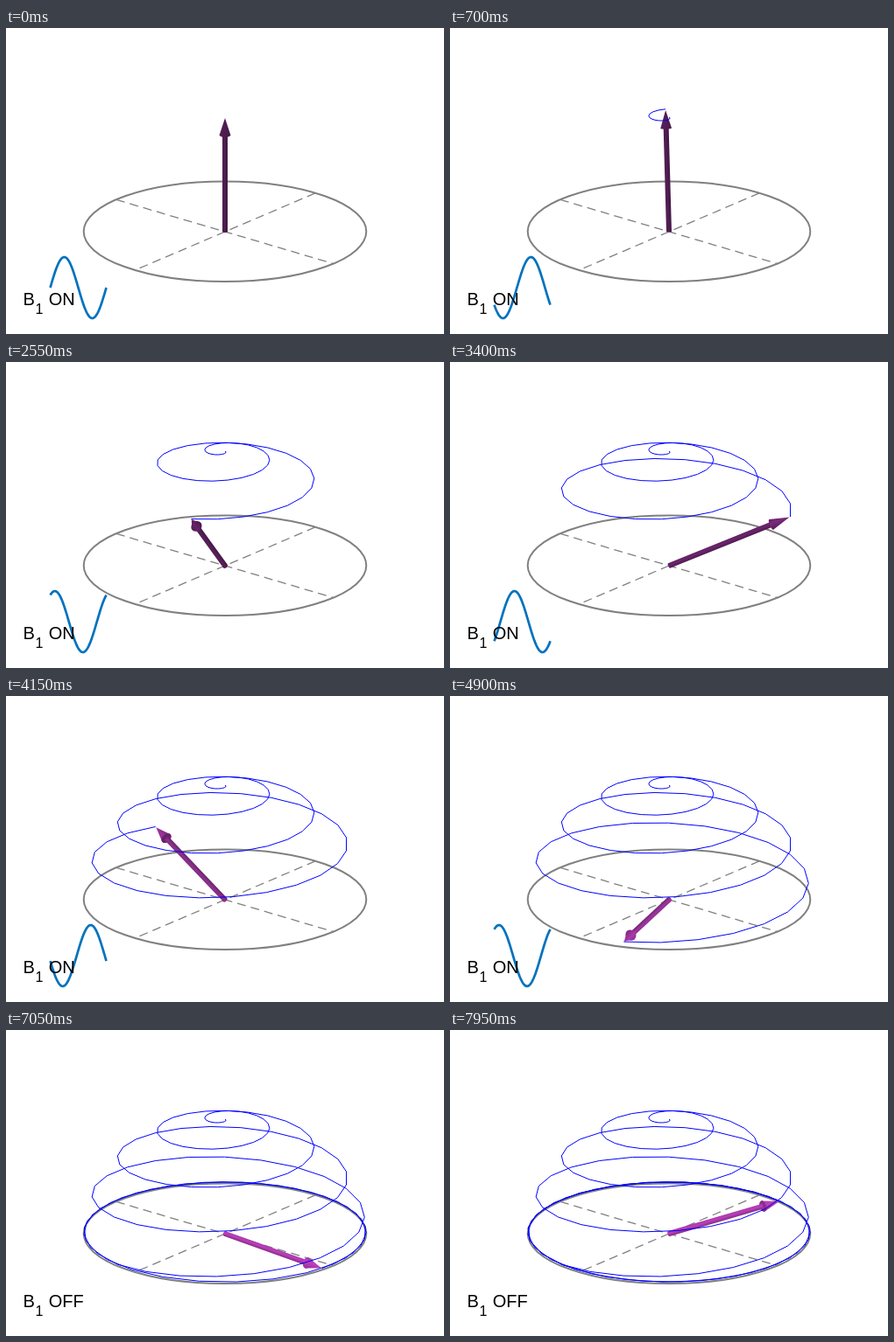
An HTML page with a canvas that plays this animation: 500 px wide and 350 px high, repeating every 8 s.

```html
<!DOCTYPE html>
<html lang="en">
<head>
<meta charset="utf-8">
<title>Precession</title>
<style>
html, body { margin: 0; width: 100%; height: 100%; overflow: hidden; background: #fff; }
canvas { display: block; }
</style>
</head>
<body>
<canvas id="stage" width="500" height="350"></canvas>
<script>
const ctx = document.getElementById('stage').getContext('2d');
const LOOP = 8000, STEP = 50, PULSE_STEPS = 100;
const CX = 250, CY = 233, RX = 161.3, RY = 57.3, RZ = 131;
const RAD = Math.PI / 180;
const TURN = 15.3 * RAD;       // precession per step
const TILT = 0.891 * RAD;      // nutation per step while the pulse is on
const START = 310.7 * RAD;
const AXIS = 50.3 * RAD;

// Unit vector at a step: right, back, up
function spin(k) {
  const tilt = TILT * Math.min(k, PULSE_STEPS);
  const turn = START - TURN * k;
  const s = Math.sin(tilt);
  return { x: s * Math.cos(turn), y: s * Math.sin(turn), z: Math.cos(tilt), s, turn };
}

const project = (v, r = 1) => [CX + RX * v.x * r, CY - (RY * v.y + RZ * v.z) * r];
const depth = v => 0.355 * v.z - 0.935 * v.y;   // positive toward the viewer
const path = Array.from({ length: LOOP / STEP }, (_, k) => spin(k));

function drawAxes() {
  ctx.strokeStyle = '#808080';
  ctx.lineWidth = 1.3;
  ctx.setLineDash([10, 6]);
  for (const a of [AXIS, AXIS + Math.PI / 2]) {
    const dx = RX * Math.cos(a), dy = RY * Math.sin(a);
    ctx.beginPath();
    ctx.moveTo(CX + dx, CY - dy);
    ctx.lineTo(CX - dx, CY + dy);
    ctx.stroke();
  }
  ctx.setLineDash([]);
  ctx.lineWidth = 2;
  ctx.beginPath();
  ctx.ellipse(CX, CY - 0.2, RX, RY, 0, 0, 2 * Math.PI);
  ctx.stroke();
}

function drawTrail(k, front) {
  ctx.strokeStyle = '#00f';
  ctx.lineWidth = 1;
  ctx.lineJoin = 'round';
  ctx.beginPath();
  let joined = false;
  for (let i = 1; i <= k; i++) {
    const a = path[i - 1], b = path[i];
    const shown = (depth(a) + depth(b) > 0) === front;
    if (shown) {
      if (!joined) ctx.moveTo(...project(a));
      ctx.lineTo(...project(b));
    }
    joined = shown;
  }
  ctx.stroke();
}

function tone(light, gain) {
  const mix = (a, b) => Math.min(255, Math.round((a + (b - a) * light) * gain));
  return `rgb(${mix(80, 168)},${mix(28, 56)},${mix(82, 168)})`;
}

function sheen(light, half, edge, mid) {
  const g = ctx.createLinearGradient(0, -half, 0, half);
  g.addColorStop(0, tone(light, 1));
  g.addColorStop(0.4, tone(light, mid));
  g.addColorStop(1, tone(light, edge));
  return g;
}

function disc(x, r, squash) {
  ctx.beginPath();
  ctx.ellipse(x, 0, Math.max(0.3, r * squash), r, 0, 0, 2 * Math.PI);
  ctx.fill();
}

function drawArrow(v) {
  const [tx, ty] = project(v, 0.992);
  const len = Math.hypot(tx - CX, ty - CY);
  const d = depth(v), squash = Math.abs(d);
  const base = len * 0.85, shaftR = 3, headR = 6.4;
  const light = v.s ** 12 * (0.45 + 0.55 * Math.min(1, 1.5 * Math.abs(Math.cos(v.turn))));

  const shaft = () => {
    ctx.fillStyle = sheen(light, shaftR, 0.8, 1 + 0.12 * v.s);
    ctx.fillRect(0, -shaftR, base, 2 * shaftR);
    disc(0, shaftR, squash);
  };
  const head = () => {
    ctx.fillStyle = sheen(light, headR, 0.88, 1 + 0.35 * v.s * (1 - 0.6 * light));
    disc(base, headR, squash);
    ctx.beginPath();
    ctx.moveTo(base, -headR);
    ctx.lineTo(len, 0);
    ctx.lineTo(base, headR);
    ctx.fill();
  };

  ctx.save();
  ctx.translate(CX, CY);
  ctx.rotate(Math.atan2(ty - CY, tx - CX));
  if (d > 0) {
    shaft();
    head();
  } else {
    head();
    ctx.fillStyle = tone(light, 0.82);
    disc(base, headR, squash);
    shaft();
  }
  ctx.restore();
}

function drawWave(k) {
  ctx.strokeStyle = '#0072bd';
  ctx.lineWidth = 2.7;
  ctx.beginPath();
  for (let i = 0; i <= 64; i++) {
    ctx.lineTo(50.5 + i, 297 - 35 * Math.sin(2 * Math.PI * i / 64 + TURN * k));
  }
  ctx.stroke();
}

function drawLabel(on) {
  const write = (text, x, y, size) => {
    ctx.font = `${size}px "Liberation Sans", Arial, sans-serif`;
    ctx.fillText(text, x, y);
  };
  ctx.fillStyle = '#000';
  write('B', 19.5, 317, 20);
  write('1', 33.5, 326.5, 16);
  write(on ? 'ON' : 'OFF', 48.7, 317, 20);
}

function draw(k) {
  const on = k < PULSE_STEPS;
  ctx.fillStyle = '#fff';
  ctx.fillRect(0, 0, 500, 350);
  drawAxes();
  drawTrail(k, false);
  drawArrow(path[k]);
  drawTrail(k, true);
  if (on) drawWave(k);
  drawLabel(on);
}

const began = performance.now();
function tick() {
  draw(Math.floor((performance.now() - began) % LOOP / STEP));
  requestAnimationFrame(tick);
}
tick();
</script>
</body>
</html>
```
